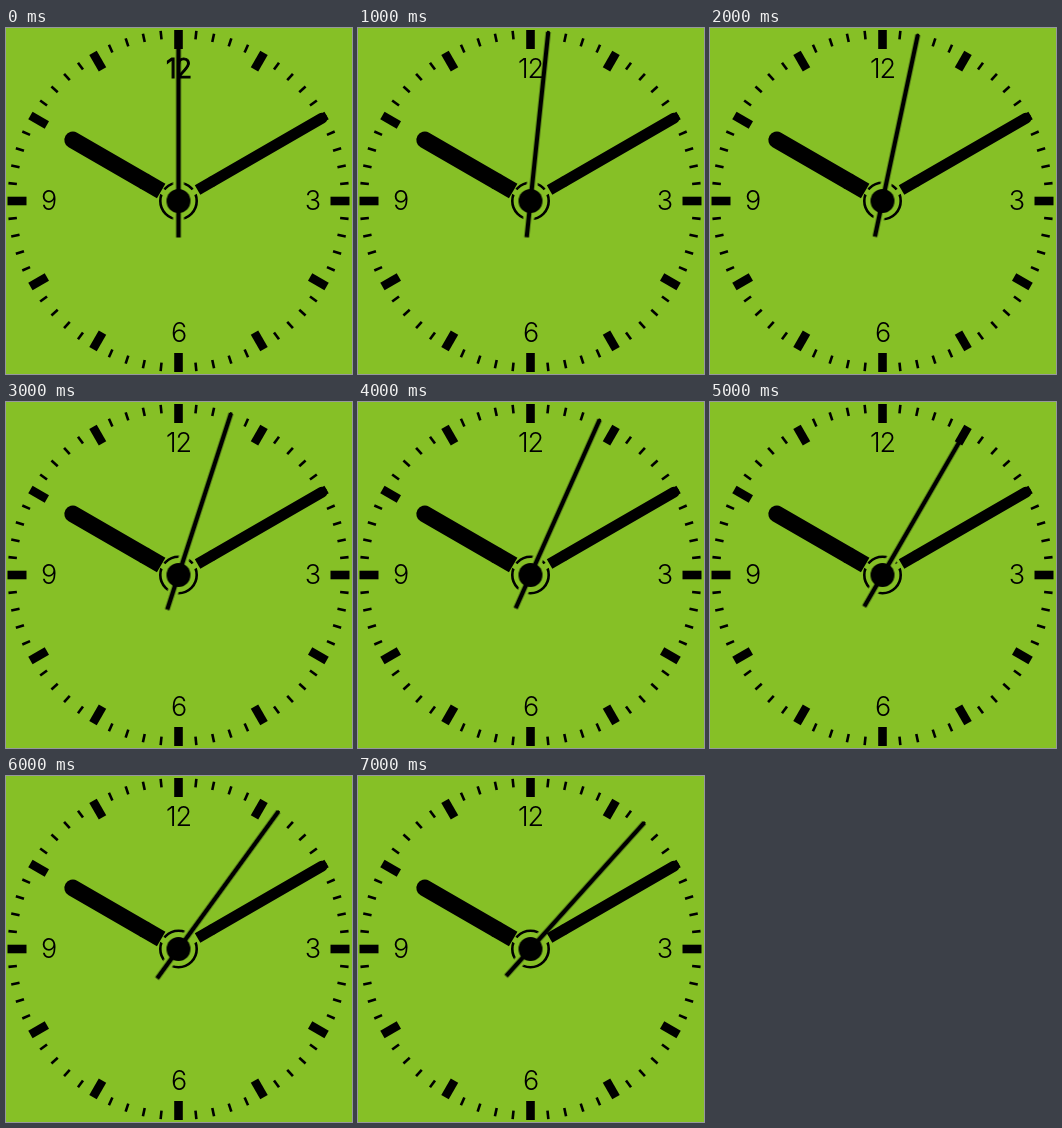
Write an HTML page that moves like this. It is 346 by 346 pixels and loops after 8 s.

```html
<!DOCTYPE html>
<html lang="en">
<head>
<meta charset="utf-8">
<title>Clock</title>
<style>
  html, body { margin: 0; width: 100%; height: 100%; overflow: hidden; background: #86c026; }
  svg { display: block; width: 100vw; height: 100vh; }
  line, circle { fill: none; stroke: #000; }
  text { font: 300 27px Inter, "Liberation Sans", sans-serif; text-anchor: middle; letter-spacing: -1px; }
  .gap { stroke: #86c026; }
  .round { stroke-linecap: round; }
  .second { animation: tick 8s steps(8) infinite; }
  .twelve { stroke: #000; stroke-width: 0; animation: heavy 8s step-end infinite; }
  @keyframes tick { to { transform: rotate(48deg); } }
  @keyframes heavy { 0% { stroke-width: 1.2px; } 12.5% { stroke-width: 0; } }
</style>
</head>
<body>
<svg viewBox="0 0 346 346">
  <g transform="translate(172.5 173)">
    <g id="marks"></g>
    <text class="twelve" y="-123">12</text>
    <text x="134" y="9">3</text>
    <text y="141">6</text>
    <text x="-130" y="9">9</text>

    <circle r="18.2" stroke-width="2.6"/>
    <g transform="rotate(-60)">
      <line class="gap" y1="-15" y2="-21" stroke-width="6"/>
      <line y1="-20" y2="-40" stroke-width="17"/>
      <line class="round" y1="-40" y2="-122" stroke-width="17"/>
    </g>
    <g transform="rotate(60)">
      <line class="gap" y1="-15" y2="-21" stroke-width="6"/>
      <line y1="-22" y2="-40" stroke-width="11"/>
      <line class="round" y1="-40" y2="-165.5" stroke-width="11"/>
    </g>
    <g class="second">
      <line class="gap" y1="-21" y2="21" stroke-width="11"/>
      <line y1="-170" y2="36.5" stroke-width="4.6"/>
    </g>
    <circle r="12" style="fill: #000; stroke: none"/>
  </g>
</svg>
<script>
  const marks = document.getElementById('marks');
  for (let i = 0; i < 60; i++) {
    const hour = i % 5 === 0;
    const mark = document.createElementNS('http://www.w3.org/2000/svg', 'line');
    mark.setAttribute('y1', -171);
    mark.setAttribute('y2', hour ? -152 : -162.5);
    mark.setAttribute('stroke-width', hour ? 8.6 : 2.6);
    mark.setAttribute('transform', `rotate(${i * 6})`);
    marks.append(mark);
  }
</script>
</body>
</html>
```
